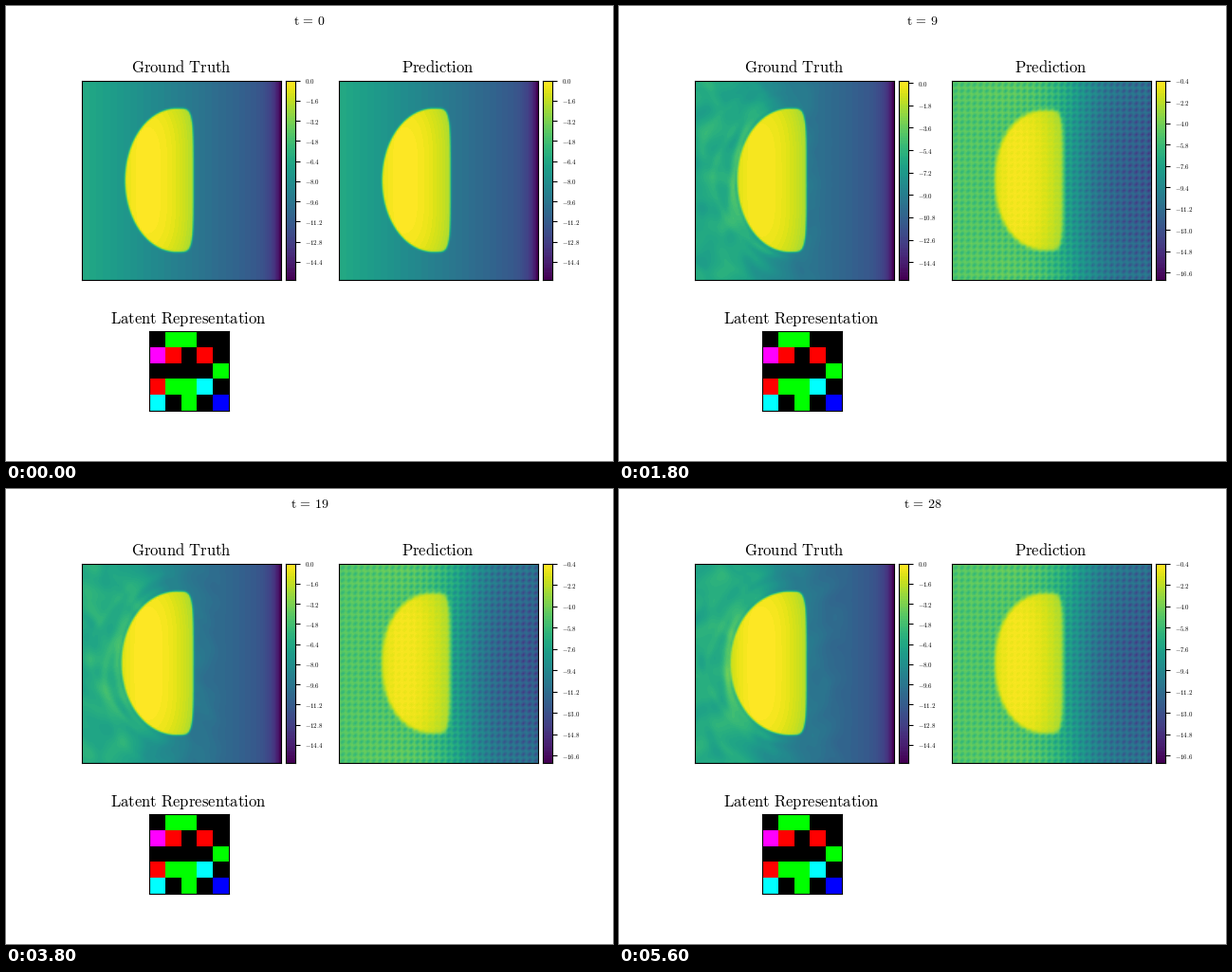
A matplotlib script for the animation above (5.8 s loop, 640 px wide and 480 px high).

```python
import numpy as np
import matplotlib.pyplot as plt
from matplotlib.animation import FuncAnimation

plt.rcParams["mathtext.fontset"] = "cm"

W, H, FRAMES = 640, 480, 29
N, SIDE = 128, 210
line = np.linspace(0, SIDE, N)
step = line[1]
X, Y = np.meshgrid(line, line)
DY = np.abs(Y - 104.8)

# Undisturbed profile: a slope that drops off at the right wall
BASE = -6.2 - 5.8 * X / SIDE - 3.8 * np.exp((X / SIDE - 1) / .035)
CORE = (-.05 - .8 * (np.clip(66 - X, 0, 30) / 22) ** 2
        - 2 * (np.clip(X - 70, 0, 60) / 48) ** 2 - .5 * (DY / 76) ** 4)


def outside(left, half=76.5, power=2.0):
    """Approximate distance from the D-shaped body, negative inside."""
    u, v = X - 100, DY / half
    r = np.where(u < 0,
                 ((np.abs(u) / left) ** power + v ** power) ** (1 / power),
                 ((np.abs(u) / 18) ** 5 + v ** 5) ** .2)
    gy, gx = np.gradient(r, step)
    return (r - 1) / (np.hypot(gx, gy) + 1e-3)


def cover(dist, soft):
    m = np.clip(.5 - dist / soft, 0, 1)
    return m * m * (3 - 2 * m)


def mix(back, front, m):
    return back * (1 - m) + front * m


def swirl(t):
    x = X + 7 * np.sin(.06 * Y + .35 * t) + 4 * np.sin(.11 * X - .09 * Y + .5 * t + 1)
    y = Y + 8 * np.sin(.05 * X - .3 * t + 2) + 4 * np.sin(.1 * x + .2 * t)
    return (np.sin(.09 * x + .05 * y + .4 * t) * np.sin(.07 * y - .04 * x - .23 * t + .7)
            + .5 * np.sin(.17 * x - .12 * y + .6 * t) * np.sin(.13 * y + .1 * x))


def shells(dist, t):
    """A halo on the body and arcs that drift away from it and fade."""
    glow = 1.3 * np.exp(-((dist - 4) / 4) ** 2)
    for k in range(3):
        away = (2.2 * t + 14 * k) % 42
        bend = 5 * np.sin(.05 * Y + 2 * k + .3 * t)
        glow = glow + 1.1 * (1 - away / 42) * np.exp(-((dist - away - bend) / 4) ** 2)
    return glow / (1 + np.exp((X - 85) / 8))


def truth(t):
    dist = outside(55 + 8 * (t / 28) ** 2)
    if t == 0:
        return mix(BASE, CORE, cover(dist, 3))
    wake = 1 / (1 + np.exp((X - 115 - 1.6 * t) / 3))
    flow = (np.exp(-((X - 45) / 32) ** 2) + shells(dist, t)
            + (.15 + .5 * np.exp(-X / 80)) * swirl(t))
    back = BASE + min(1, t / 2) * wake * flow
    return mix(back, CORE + .05, cover(dist, 3))


def predicted():
    back = -5.1 - 7.6 / (1 + np.exp((132 - X) / 20))
    back += .9 * (DY / 105) ** 2 * X / 120
    j, i = np.indices(X.shape) - 2
    q = np.pi / 2
    dots = np.cos(q * i) + np.cos(q * j) + .6 * np.cos(q * (i + j))
    m = cover(outside(55.5, 75, 2.15), 7)
    amp = mix(.45 + .4 * X / SIDE, .12, m)
    return mix(back, CORE - .7, m) - amp * dots


PREDICTED = predicted()

fig = plt.figure(figsize=(W / 100, H / 100), dpi=100, facecolor="white")


def roman(text):
    return r"$\mathrm{%s}$" % text.replace(" ", r"\ ")


def add_axes(x, y, w, h):
    ax = fig.add_axes([x / W, 1 - (y + h) / H, w / W, h / H])
    ax.set_xticks([])
    ax.set_yticks([])
    return ax


class Panel:
    def __init__(self, x, title):
        ax = add_axes(x, 78.6, 209.95, 209.95)
        ax.set_title(roman(title), fontsize=12)
        self.im = ax.imshow(BASE, aspect="auto", interpolation="bilinear",
                            interpolation_stage="data")
        self.bar = add_axes(x + 214.95, 78.6, 10.5, 209.95)
        self.ramp = self.bar.imshow(np.linspace(1, 0, 320)[:, None], aspect="auto",
                                    cmap=plt.get_cmap("viridis", 80),
                                    interpolation="nearest")
        self.bar.yaxis.tick_right()
        self.bar.tick_params(labelsize=5)

    def show(self, data, lo, hi, first, gap):
        self.im.set_data(np.clip(data, lo, hi))
        self.im.set_cmap(plt.get_cmap("viridis", round((hi - lo) / .2)))
        self.im.set_clim(lo, hi)
        self.ramp.set_extent((0, 1, lo, hi))
        self.bar.set_ylim(lo, hi)
        ticks = [first - gap * k for k in range(int((first - lo) / gap) + 1)]
        self.bar.set_yticks(ticks, [f"${v:.1f}$" for v in ticks])


left = Panel(80, "Ground Truth")
right = Panel(350.55, "Prediction")

COLORS = dict(K="#000000", R="#ff0000", G="#00ff00",
              B="#0000ff", M="#ff00ff", C="#00ffff")
latent = add_axes(150.7, 343.2, 84, 84)
latent.set_title(roman("Latent Representation"), fontsize=12)
latent.imshow([[plt.matplotlib.colors.to_rgb(COLORS[c]) for c in row] for row in
               ("KGGKK", "MRKRK", "KKKKG", "RGGCK", "CKGKB")],
              aspect="auto", interpolation="nearest")

clock = fig.text(.5, .982, "", ha="center", va="top", fontsize=10)


def draw(t):
    clock.set_text(r"$\mathrm{t\,=\,%d}$" % t)
    data = truth(t)
    if 0 < t < 14:
        left.show(data, -15.8, .2, 0, 1.8)
    else:
        left.show(data, -15.8, 0, 0, 1.6)
    if t == 0:
        right.show(data, -15.8, 0, 0, 1.6)
    else:
        right.show(PREDICTED, -17.2, -.4, -.4, 1.8)


anim = FuncAnimation(fig, draw, frames=FRAMES, init_func=lambda: draw(0),
                     interval=200, repeat=True, repeat_delay=0)
plt.show()
```
